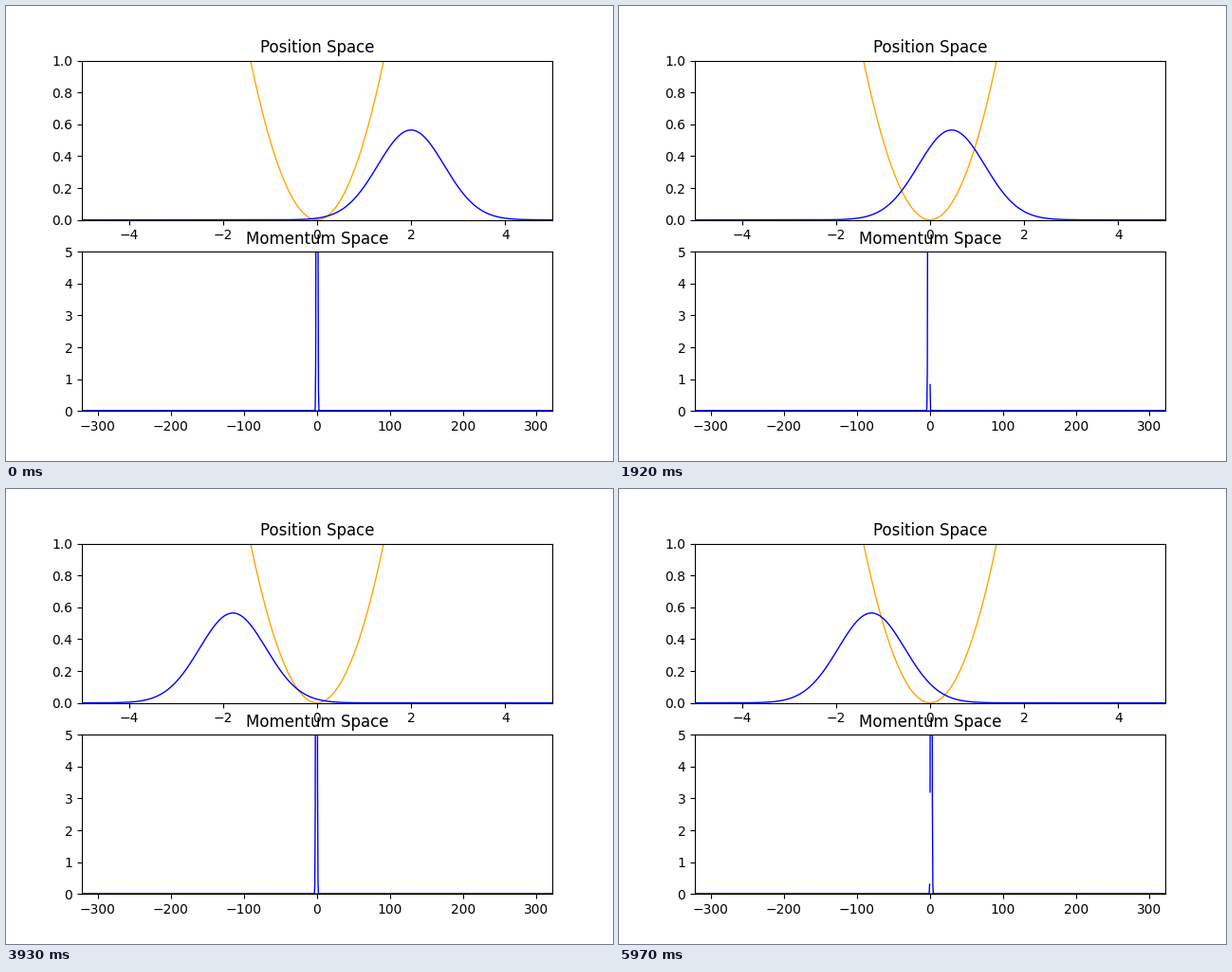
Animation, 640 px wide and 480 px high, one loop 6 s. Source, as a matplotlib script:

```python
import numpy as np
import matplotlib.pyplot as plt
from matplotlib.animation import FuncAnimation

FRAMES, INTERVAL = 200, 30
XMAX, N = 5.0, 1024
DT = 0.02        # time per frame
START = 0.06     # time already elapsed at the first frame
LAG = 0.005      # momentum is sampled half a substep earlier
X0 = 2.0         # initial displacement

dx = 2 * XMAX / N
x = -XMAX + dx * (np.arange(N) + 0.5)
k = 2 * np.pi * np.fft.fftfreq(N, dx)   # FFT order, so the line wraps around


def position_density(t):
    return np.exp(-(x - X0 * np.cos(t)) ** 2) / np.sqrt(np.pi)


def momentum_density(t):
    scale = 2 * np.sqrt(np.pi) / (N * dx ** 2)
    return scale * np.exp(-(k + X0 * np.sin(t)) ** 2)


def setup(ax, title, xlim, ymax):
    ax.set_title(title)
    ax.set_xlim(-xlim, xlim)
    ax.set_ylim(0, ymax)


fig, (ax_x, ax_k) = plt.subplots(2, 1, figsize=(6.4, 4.8), dpi=100)
setup(ax_x, "Position Space", XMAX, 1)
setup(ax_k, "Momentum Space", np.pi / dx, 5)

ax_x.plot(x, 0.5 * x ** 2, color="orange", lw=1)
wave_x, = ax_x.plot(x, position_density(START), color="blue", lw=1)
wave_k, = ax_k.plot(k, momentum_density(START - LAG), color="blue", lw=1)


def update(i):
    t = START + i * DT
    wave_x.set_ydata(position_density(t))
    wave_k.set_ydata(momentum_density(t - LAG))
    return wave_x, wave_k


anim = FuncAnimation(fig, update, frames=FRAMES, interval=INTERVAL,
                     repeat=True, repeat_delay=0)
plt.show()
```
